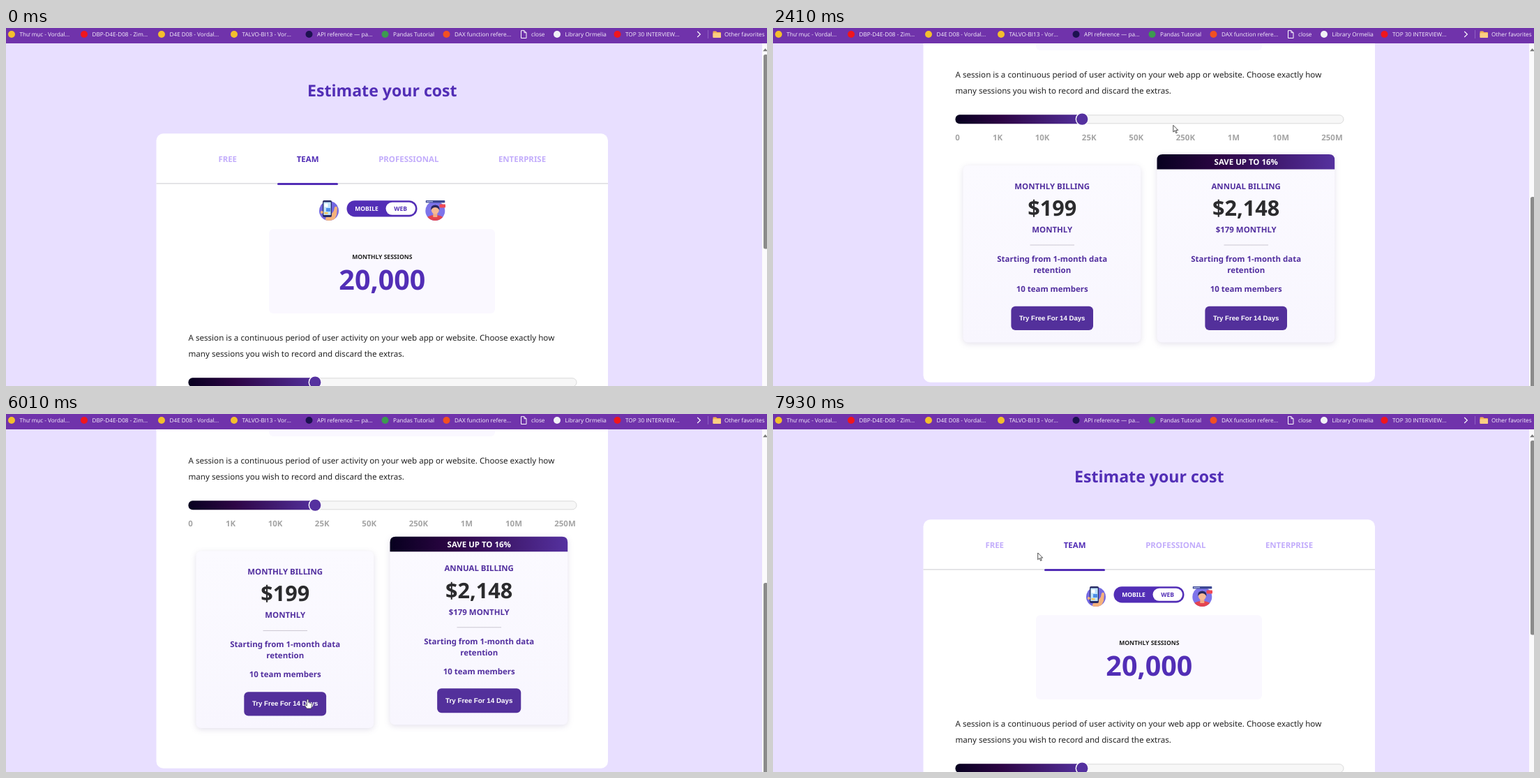
Recreate the animation shown at these times as an HTML page. Size 1091 by 513 pixels, loop 8 s.

```html
<!DOCTYPE html>
<html lang="en">
<head>
<meta charset="utf-8">
<title>Estimate your cost</title>
<style>
  html, body { margin: 0; width: 100%; height: 100%; overflow: hidden; background: #e8dfff; }
  svg { display: block; width: 100%; height: 100%; }
  text { font: 600 11.45px "Noto Sans", "Open Sans", sans-serif; text-anchor: middle; text-rendering: geometricPrecision; white-space: pre; }
  .title { font-size: 23.1px; fill: #522eb6; }
  .tab { fill: #c2acfb; }
  .tab.on { fill: #522eb6; }
  .small { font-size: 8.55px; }
  .count { font-size: 39.4px; fill: #522eb6; }
  .body { font-weight: 400; font-size: 11.6px; text-anchor: start; fill: #222; }
  .tick { fill: #a4a4a4; }
  .plan { fill: #522f9f; }
  .price { font-size: 30.6px; fill: #2b2b2d; }
  .cta { font: 700 9.6px "Liberation Sans", Arial, sans-serif; fill: #fff; }
  .mark { font: 400 8.2px "Open Sans", "Noto Sans", sans-serif; text-anchor: start; fill: #f8f2fd; }
  .shade { filter: drop-shadow(0 2px 4px rgba(70, 50, 120, .15)); }
</style>
</head>
<body>
<svg viewBox="0 0 1091 513">
  <defs>
    <linearGradient id="night">
      <stop offset="0" stop-color="#07001f"/>
      <stop offset=".36" stop-color="#2d0545"/>
      <stop offset="1" stop-color="#55319f"/>
    </linearGradient>
    <linearGradient id="paper" x2="0" y2="1">
      <stop offset="0" stop-color="#fbfaff"/>
      <stop offset="1" stop-color="#f8f6fe"/>
    </linearGradient>
    <clipPath id="left"><circle cx="463" cy="262" r="14"/></clipPath>
    <clipPath id="right"><circle cx="615.3" cy="262" r="14"/></clipPath>
  </defs>
  <rect width="1091" height="513" fill="#e8dfff"/>
  <g id="page"></g>
  <g id="bar"></g>
  <g id="rail">
    <rect x="1084" y="22" width="7" height="491" fill="#fbfafc"/>
    <path d="M1085.2 33.2L1088.5 29.2L1091.8 33.2Z" fill="#777"/>
    <rect id="thumb" x="1086" y="38" width="6" height="278.5" rx="2.5" fill="#8b8b8b"/>
  </g>
  <path id="arrow" d="M0 0V9.7L2.3 7.6L3.9 11.3L5.5 10.6L3.9 7.1H7Z" fill="#fff" stroke="#222" stroke-width=".8"/>
  <path id="hand" d="M0 0C.8 0 1.2.5 1.2 1.2V4.6L5 5.6C5.8 5.8 6.2 6.4 6.1 7.2L5.6 11L5 13H-1.2L-4 9C-4.6 8-3.2 7.3-2.4 8.2L-1.2 9.3V1.2C-1.2.5-.8 0 0 0Z" fill="#fff" stroke="#333" stroke-width=".7"/>
</svg>
<script>
const $ = id => document.getElementById(id);
const text = (cls, x, y, s) => `<text class="${cls}" x="${x}" y="${y}">${s}</text>`;
const rect = (x, y, w, h, fill, r = 0, more = '') =>
  `<rect x="${x}" y="${y}" width="${w}" height="${h}" rx="${r}" fill="${fill}" ${more}/>`;
const circle = (x, y, r, fill, more = '') =>
  `<circle cx="${x}" cy="${y}" r="${r}" fill="${fill}" ${more}/>`;
const path = (d, fill, more = '') => `<path d="${d}" fill="${fill}" ${more}/>`;

// ---- bookmark bar ----
function bar() {
  const yellow = '#f3bf2c', red = '#f0161c';
  const marks = [
    [19.5, 'Thư mục - Vordal...', yellow], [123.5, 'DBP-D4E-D08 - Zim...', red],
    [234.5, 'D4E D08 - Vordal...', yellow], [338.5, 'TALVO-BI13 - Vor...', yellow],
    [446, 'API reference — pa...', '#1c1250'], [555, 'Pandas Tutorial', '#3d9b50'],
    [643, 'DAX function refere...', '#f25022'], [753, 'close'],
    [801.5, 'Library Ormelia', '#f1f1f6'], [888, 'TOP 30 INTERVIEW...', red], [1030, 'Other favorites']
  ];
  return rect(0, 0, 1091, 22, '#7033ab') +
    marks.map(([x, s, c]) => text('mark', x, 12, s) + (c ? circle(x - 11.5, 9, 5, c) : '')).join('') +
    path('M738.5 3.7H743L746 6.7V14.5H738.5ZM743 3.7V6.7H746', 'none', 'stroke="#fff"') +
    path('M991.2 5L995.4 9L991.2 13', 'none', 'stroke="#fff" stroke-width="1.1"') +
    rect(1006, 3, .8, 12, '#9a6cc8') +
    path('M1013.5 5.5Q1013.5 4.5 1014.5 4.5H1018L1019.5 6H1024Q1025 6 1025 7V13Q1025 14 1024 14H1014.5Q1013.5 14 1013.5 13Z', '#f0b255') +
    rect(1013.5, 7.2, 11.5, 6.8, '#fbcf83', 1);
}

// ---- small illustrations beside the switch ----
function phoneIcon() {
  return circle(463, 262, 14, '#7468e0') +
    `<g clip-path="url(#left)">` +
    path('M456 280L460 268Q470 268 471 257Q474 254 475 258L474 268L468 280Z', '#f5b27c') + `</g>` +
    rect(454, 247, 13, 24, '#262a63', 2) + rect(455.3, 249.5, 10.4, 18.5, '#bfe3fa') +
    rect(456.5, 251.5, 5, 5, '#fff') + rect(459, 258, 6, 5, '#4c8de8') +
    rect(456.5, 264, 5, 2.5, '#f8c85a') + circle(452.8, 264, 2, '#f5b27c');
}
function webIcon() {
  return circle(615.3, 262, 14, '#7d74ea') + `<g clip-path="url(#right)">` +
    path('M600 280V274Q606 268 615 268T631 274V280Z', '#e4444f') +
    rect(612.3, 262, 6, 9, '#f3ab85') + circle(615.3, 261, 5.5, '#f7b995') +
    path('M609.2 261Q608.7 253.5 615.3 253.5T621.4 261Q619 257 615.3 257T609.2 261Z', '#29285e') + `</g>` +
    rect(601.8, 247, 27.5, 3.6, '#3c4793', .8) + rect(603, 248.3, 9, 1, '#d5dcff') +
    rect(621.5, 252.5, 8.5, 5, '#ef4a55', 1);
}

function plan(id, x, name, price, per, banner) {
  const top = banner ? 558 : 574;
  const l = x - 127.7, r = x + 127;
  return `<g id="${id}">` +
    rect(l, top, r - l, 827.5 - top, 'url(#paper)', 7, 'class="shade"') +
    (banner ? path(`M${l} 579.5V566Q${l} 558 ${l + 8} 558H${r - 8}Q${r} 558 ${r} 566V579.5Z`, 'url(#night)') +
      `<g fill="#fff">${text('', x, 573, banner)}</g>` : '') +
    text('plan', x, 607.6, name) + text('price', x, 646, price) + text('plan', x, 669.8, per) +
    rect(x - 31.7, 687.5, 63.5, 1, '#cbc8d2') +
    text('plan', x, 712, 'Starting from 1-month data') + text('plan', x, 727.8, 'retention') +
    text('plan', x, 754.8, '10 team members') +
    `<g id="${id}Btn">` + rect(x - 58.8, 775.8, 117.6, 34.3, '#53309b', 6) +
    text('cta', x, 795.9, 'Try Free For 14 Days') + `</g></g>`;
}

function page() {
  const tabs = [[317.7, 'FREE'], [432.6, 'TEAM'], [577.3, 'PROFESSIONAL'], [740, 'ENTERPRISE']];
  const ticks = [[264.6, '0'], [322, '1K'], [386, '10K'], [453.2, '25K'], [520.7, '50K'],
    [591.4, '250K'], [660.4, '1M'], [728, '10M'], [801.5, '250M']];
  return text('title', 539.3, 98, 'Estimate your cost') +
    rect(215.5, 151.3, 647.5, 733.4, '#fff', 10) +
    tabs.map(([x, s], i) => text(i === 1 ? 'tab on' : 'tab', x, 192.2, s)).join('') +
    rect(215.5, 222, 647.5, 1.6, '#dedee2') + rect(389, 222, 87, 3, '#522eb6', 1.5) +
    phoneIcon() + webIcon() +
    rect(488.5, 247.2, 101, 23.3, '#522eb6', 11.6) + rect(544.5, 249.8, 42.5, 18, '#fff', 9) +
    `<g fill="#fff">${text('small', 517, 262.1, 'MOBILE')}</g>` +
    `<g fill="#522eb6">${text('small', 565.7, 262.1, 'WEB')}</g>` +
    rect(377, 288.3, 324, 120.8, '#faf8ff', 6) +
    `<g fill="#222">${text('small', 539.3, 331.3, 'MONTHLY SESSIONS')}</g>` +
    text('count', 539.3, 375.2, '20,000') +
    text('body', 261.5, 447.7, 'A session is a continuous period of user activity on your web app or website. Choose exactly how') +
    text('body', 261.5, 470.7, 'many sessions you wish to record and discard the extras.') +
    rect(262, 501.8, 556, 12, '#f7f7f7', 6, 'stroke="#d6d6d6" stroke-width=".9"') +
    rect(261.5, 501.3, 185, 13, 'url(#night)', 6) +
    circle(443.2, 507.6, 8.9, '#55319f', 'stroke="#fff" stroke-width="1.4"') +
    ticks.map(([x, s]) => text('tick', x, 537.6, s)).join('') +
    plan('month', 400.2, 'MONTHLY BILLING', '$199', 'MONTHLY') +
    plan('year', 678.2, 'ANNUAL BILLING', '$2,148', '$179 MONTHLY', 'SAVE UP TO 16%');
}

$('page').innerHTML = page();
$('bar').innerHTML = bar();

// ---- motion ----
const LOOP = 8000;
// bursts of screen updates: first, last, count
const bursts = [[390, 730, 6], [930, 930, 1], [1150, 1480, 5], [1740, 1740, 1], [2010, 2010, 1],
  [2210, 2410, 3], [3980, 4320, 6], [4450, 4730, 5], [4800, 5010, 4], [5270, 5670, 7],
  [5870, 6010, 3], [6070, 6610, 8], [6680, 7450, 12], [7520, 7930, 6]];
const pointer = [[390, 1055, 503], [730, 609, 145.5], [930, 616, 147], [1150, 622, 151], [1480, 573.8, 139.3],
  [3912, 573.8, 139.3], [4320, 371.3, 307.8], [4450, 410, 306], [4730, 575, 318], [5010, 640, 325],
  [5200, 640, 325], [5670, 700, 410], [5800, 690, 410], [5910, 619, 410], [6010, 432.5, 409],
  [6200, 470, 390], [6610, 521.7, 338], [7000, 560, 270], [7450, 613, 186], [7930, 379.7, 199]];
const scroll = [[1480, 0], [1740, 50], [2010, 160], [2210, 260], [2310, 335], [2410, 377],
  [6440, 377], [6610, 300], [7000, 145], [7450, 0]];

function snap(t) {
  let at = 0;
  for (const [a, b, n] of bursts) {
    if (t < a) break;
    const gap = n > 1 ? (b - a) / (n - 1) : 1;
    at = a + gap * Math.min(n - 1, Math.floor((t - a) / gap + 1e-6));
  }
  return at;
}

function along(keys, t, k = 1) {
  const i = keys.findIndex(key => key[0] > t);
  if (i < 0) return keys[keys.length - 1][k];
  if (i === 0) return keys[0][k];
  const a = keys[i - 1], b = keys[i];
  return a[k] + (b[k] - a[k]) * (t - a[0]) / (b[0] - a[0]);
}

// cubic-bezier(.25, .1, .25, 1)
function ease(p) {
  if (p <= 0) return 0;
  if (p >= 1) return 1;
  const curve = (u, a, b) => 3 * (1 - u) * (1 - u) * u * a + 3 * (1 - u) * u * u * b + u * u * u;
  let lo = 0, hi = 1;
  for (let i = 0; i < 20; i++) {
    const mid = (lo + hi) / 2;
    if (curve(mid, .25, .25) < p) lo = mid; else hi = mid;
  }
  return curve(lo, .1, 1);
}
const hover = (t, from, to) => ease((t - from) / 300) - ease((t - to) / 300);
const move = (id, x, y) => $(id).setAttribute('transform', `translate(${x} ${y})`);

function swell(id, x, v) {
  const y = 793;
  $(id).setAttribute('transform', `translate(${x} ${y}) scale(${1 + .05 * v}) translate(${-x} ${-y})`);
}

function draw(now) {
  const t = snap(now % LOOP);
  const top = along(scroll, t);
  move('page', 0, -top);
  move('thumb', 0, top * .541);
  move('month', 0, -5.8 * (hover(t, 4020, 4690) + hover(t, 5980, 6800)));
  move('year', 0, -5.8 * hover(t, 4710, 5980));
  swell('monthBtn', 400.2, hover(t, 5995, 6110));
  swell('yearBtn', 678.2, hover(t, 5370, 5910));

  const x = along(pointer, t, 1), y = along(pointer, t, 2);
  const onButton = t > 5590 && t < 5910 || t > 5990 && t < 6150;
  move('arrow', x, y);
  move('hand', x, y);
  $('arrow').style.display = t >= 390 && !onButton ? '' : 'none';
  $('hand').style.display = onButton ? '' : 'none';
}

const start = performance.now();
function tick() {
  draw(performance.now() - start);
  requestAnimationFrame(tick);
}
tick();
</script>
</body>
</html>
```
